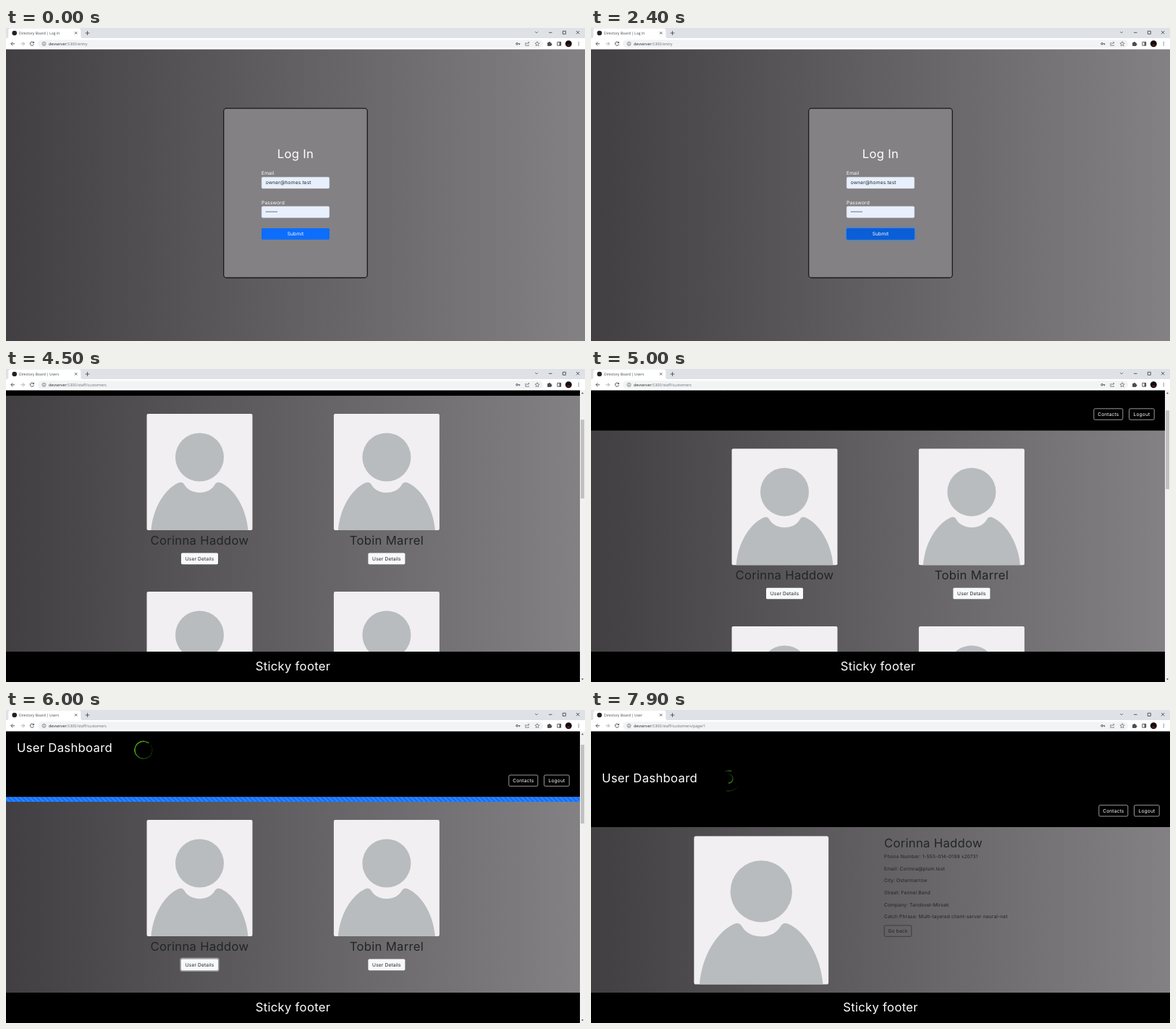
Recreate the animation shown at these times as an HTML page. Size 800x433 px, loop 8 s.

```html
<!DOCTYPE html>
<html lang="en">
<head>
<meta charset="utf-8">
<title>Directory Board</title>
<style>
  html, body { margin: 0; width: 100%; height: 100%; overflow: hidden; background: #000; }
  svg { display: block; width: 100%; height: 100%; }
  text { font: 6.67px Inter, sans-serif; letter-spacing: .13px; text-rendering: geometricPrecision; }
  .big { font-size: 16.67px; letter-spacing: .3px; }
  .mid { text-anchor: middle; }
  .light { fill: #fff; }
  .dark { fill: #212529; }
  .ui, .ui tspan { font: 5px "Open Sans", sans-serif; letter-spacing: 0; }
  .url, .url tspan { font-size: 5.4px; }
  .icon { fill: none; stroke: #4a4d51; stroke-width: .9; }
  .outline { fill: none; stroke: #fff; stroke-width: .6; }
  .field { fill: #e8f0fe; stroke: #ced4da; stroke-width: .4; }
  .pale { fill: #f8f9fa; }
</style>
</head>
<body>
<svg viewBox="0 0 800 433" preserveAspectRatio="none">
  <defs>
    <linearGradient id="shade">
      <stop stop-color="#413f41"/><stop offset="1" stop-color="#838183"/>
    </linearGradient>
    <pattern id="stripes" width="6.667" height="6.667" patternUnits="userSpaceOnUse">
      <rect width="7" height="7" fill="#0d6efd"/>
      <path d="M0 0H3.333L6.667 3.333V6.667ZM0 3.333L3.333 6.667H0Z" fill="#fff" fill-opacity=".15"/>
    </pattern>
    <g id="person">
      <rect x="-73" width="146" height="161" rx="2" fill="#f1eff2"/>
      <g fill="#b8bcbe">
        <circle cy="60" r="33.5"/>
        <path d="M-67 161C-64.500 130-48 104-29.500 95.500Q-24 93-21 98C-17 105-9.500 109 0 109S17 105 21 98Q24 93 29.500 95.500C48 104 64.500 130 67 161Z"/>
      </g>
    </g>
    <g id="details">
      <rect class="pale" x="-25.500" width="51" height="15.700" rx="1.700"/>
      <text class="mid dark" y="10.200">User Details</text>
    </g>
  </defs>

  <g id="login">
    <rect y="29" width="800" height="404" fill="url(#shade)"/>
    <rect x="300.700" y="111.200" width="198.600" height="234.300" rx="4" fill="#838183" stroke="#1b1a1b" stroke-width="1.300"/>
    <text class="big mid light" x="400" y="179.700">Log In</text>
    <text class="light" x="353" y="203.200">Email</text>
    <rect class="field" x="353.200" y="206.300" width="93.600" height="15.700" rx="1.700"/>
    <text class="dark" x="358.700" y="216.300">owner@homes.test</text>
    <text class="light" x="353" y="243.500">Password</text>
    <rect class="field" x="353.200" y="246.700" width="93.600" height="15.700" rx="1.700"/>
    <path d="M359.700 254.200H375" fill="none" stroke="#212529" stroke-width="1.300" stroke-linecap="round" stroke-dasharray="0 2.050"/>
    <rect x="353" y="277" width="94" height="15.800" rx="1.700" fill="#0d6efd"/>
    <g id="submitFocus">
      <rect x="352.200" y="276.200" width="95.600" height="17.400" rx="2.300" fill="none" stroke="#3184fd" stroke-opacity=".5" stroke-width="1.670"/>
      <rect x="353" y="277" width="94" height="15.800" rx="1.700" fill="#0b5ed7"/>
    </g>
    <text class="mid light" x="400" y="287.200">Submit</text>
  </g>

  <g id="dashboard">
    <rect id="backdrop" y="29" height="404" fill="url(#shade)"/>
    <g id="cards">
      <use href="#person" x="267.500" y="187"/>
      <use href="#person" x="525.900" y="187"/>
      <use href="#person" x="267.500" y="432.900"/>
      <use href="#person" x="525.900" y="432.900"/>
      <text class="big mid dark" x="267.500" y="368">Corinna Haddow</text>
      <text class="big mid dark" x="525.900" y="368">Tobin Marrel</text>
      <rect id="detailsFocus" x="241.200" y="378.700" width="52.600" height="17.300" rx="2.300" fill="none" stroke="#d3d4d5" stroke-opacity=".6" stroke-width="1.670"/>
      <use href="#details" x="267.500" y="379.500"/>
      <use href="#details" x="525.900" y="379.500"/>
    </g>
    <g id="profile">
      <use href="#person" transform="translate(235.250 174.500) scale(1.273)"/>
      <text class="big dark" x="405" y="190.300">Corinna Haddow</text>
      <text class="dark" x="405" y="204.900">Phone Number: 1-555-014-0199 x20731</text>
      <text class="dark" x="405" y="221.500">Email: Corinna@plum.test</text>
      <text class="dark" x="405" y="238.200">City: Ostermarrow</text>
      <text class="dark" x="405" y="254.900">Street: Fennel Bend</text>
      <text class="dark" x="405" y="271.500">Company: Tandovel-Mirsek</text>
      <text class="dark" x="405" y="288.200">Catch Phrase: Multi-layered client-server neural-net</text>
      <rect x="405.200" y="298" width="37.600" height="15.300" rx="1.700" fill="none" stroke="#212529" stroke-width="0.600"/>
      <text class="mid dark" x="424" y="308.100">Go back</text>
    </g>
    <g id="header">
      <rect y="29" width="800" height="133"/>
      <rect id="progress" y="162" width="793" height="6.667" fill="url(#stripes)"/>
      <text class="big light" x="15" y="99.800">User Dashboard</text>
      <g id="spinner" fill="none" stroke="#4fae1c" stroke-width="1.300"></g>
      <g id="nav">
        <rect class="outline" x="694.800" y="131.700" width="40" height="15.300" rx="1.700"/>
        <text class="mid light" x="714.800" y="141.800">Contacts</text>
        <rect class="outline" x="743.500" y="131.700" width="34.700" height="15.300" rx="1.700"/>
        <text class="mid light" x="760.900" y="141.800">Logout</text>
      </g>
    </g>
    <rect y="391" width="800" height="42"/>
    <text class="big mid light" id="footer" y="416.500">Sticky footer</text>
    <g id="scrollbar">
      <rect x="793" y="29" width="7" height="404" fill="#f1f1f1"/>
      <path d="M794.900 34.300L796.500 32.300L798.100 34.300ZM794.900 428.300L796.500 430.300L798.100 428.300Z" fill="#505050"/>
      <rect id="thumb" x="794" y="37" width="5" height="109" fill="#c1c1c1"/>
    </g>
  </g>

  <g id="browser">
    <rect width="800" height="14" fill="#dee1e6"/>
    <rect y="14" width="800" height="15.500" fill="#fff"/>
    <path d="M0 14.200Q3.300 14.200 3.300 11V3.500Q3.300 .5 6.500 .5H100Q103.300 .5 103.300 3.500V11Q103.300 14.200 106.500 14.200Z" fill="#fff"/>
    <rect x="44" y="16.200" width="698" height="11.300" rx="5.650" fill="#f1f3f4"/>
    <circle cx="11.700" cy="7" r="3.300" fill="#222"/>
    <text class="ui" id="title" x="18" y="8.800" fill="#3c4043"></text>
    <text class="ui url" x="59" y="23.700" fill="#202124">devserver<tspan id="path" fill="#6b6f74"></tspan></text>
    <g class="icon">
      <path d="M95 5.300L98.200 8.500M98.200 5.300L95 8.500M109.700 7H115.300M112.500 4.200V9.800"/>
      <path d="M12 21.800H6.800M9.400 19.200L6.800 21.800L9.400 24.400"/>
      <path d="M20.500 21.800H25.700M23.100 19.200L25.700 21.800L23.100 24.400" stroke="#a5a8ab"/>
      <path d="M38.100 20.200A2.600 2.600 0 1 0 38.500 22.300M38.500 18.900V20.700H36.600"/>
      <circle cx="52.500" cy="21.800" r="2.500" stroke-width=".6"/>
      <path d="M52.500 21.400V23.300M52.500 20.200V20.800" stroke-width=".7"/>
      <circle cx="706" cy="21.800" r="1.300"/>
      <path d="M707.300 21.800H710.300M709.500 21.800V23.300"/>
      <path d="M719 20.500H717.800V24.300H722.300V23M719.300 22.500Q719.500 20.300 722.800 20.200M721.500 18.800L723 20.200L721.500 21.600" stroke-width=".6"/>
      <path d="M734 18.700L734.900 20.800L737.100 21L735.400 22.500L735.900 24.700L734 23.500L732.100 24.700L732.600 22.500L730.900 21L733.100 20.800Z" stroke-width=".6"/>
      <path d="M748.500 20.500H750V19.500H751.500V20.500H753V22H754V23.300H753V24.500H748.500Z" fill="#4a4d51"/>
      <path d="M761.800 19.400H766.700V24.200H761.800Z"/>
      <path d="M765.600 19.400V24.200" stroke-width="2"/>
      <path d="M731 5L733 7L735 5" stroke-width=".7"/>
      <path d="M750 6.300H754.500M769.300 4.300H773.300V8.300H769.300ZM788 4L792.300 8.300M792.300 4L788 8.300" stroke="#222" stroke-width=".7"/>
      <path d="M791.200 19.700V24" stroke-width="1.200" stroke-linecap="round" stroke-dasharray="0 2"/>
    </g>
    <circle cx="777.300" cy="21.800" r="4.500" fill="#160b0c"/>
    <path d="M774.500 24.500Q777.300 20.500 780 24.500Z" fill="#6b2020"/>
  </g>
</svg>
<script>
const $ = id => document.getElementById(id);
const show = (id, on) => { $(id).style.display = on ? '' : 'none'; };
const shift = (id, x, y) => $(id).setAttribute('transform', `translate(${x} ${y})`);
const clamp = x => Math.min(1, Math.max(0, x));
const ramp = (t, start, length) => { const x = clamp((t - start) / length); return x * x * (3 - 2 * x); };

const LOOP = 8000, STEP = 100;
const SUBMIT = 2050, CONTACTS = 3800, OPEN = 5550, PROFILE = 7300;
const NOTCH = 41.67;
// Wheel notches: start time and direction
const wheel = [[3900, 1], [4050, 1], [4250, 1], [4750, -1], [4950, -1]];
const scrollAt = t => wheel.reduce((sum, [start, dir]) => sum + dir * NOTCH * ramp(t, start, 200), 0);

// Blend three spinner poses over time
const blend = (t, a, b, c) => t < 6000
  ? a + (b - a) * clamp((t - 3800) / 2200)
  : b + (c - b) * clamp((t - 6000) / 1900);

function comet(r, head, span, alpha, cy) {
  const pieces = 14, slice = span / pieces;
  const point = deg => {
    const a = deg * Math.PI / 180;
    return `${(190 + r * Math.cos(a)).toFixed(2)} ${(cy + r * Math.sin(a)).toFixed(2)}`;
  };
  let out = '';
  for (let i = 0; i < pieces; i++) {
    const from = head - span + i * slice;
    out += `<path d="M${point(from)}A${r} ${r} 0 0 1 ${point(from + slice * .9)}" stroke-opacity="${alpha * (i + 2) / (pieces + 1)}"/>`;
  }
  return out;
}

function drawSpinner(t) {
  const s = (t - 3800) / 1000, cy = blend(t, 94, 97, 95);
  $('spinner').innerHTML =
    comet(blend(t, 14.5, 12, 17), 80 + 268.3 * s, blend(t, 215, 345, 65), blend(t, .9, 1, .4), cy) +
    comet(blend(t, .5, 12, 11), -70 + 200 * (s - 4.1), blend(t, 360, 180, 50), 1, cy) +
    comet(blend(t, .5, 12, 6), 90 - 240 * (s - 4.1), blend(t, 360, 60, 190), 1, cy);
}

function draw(t) {
  const inside = t >= CONTACTS, profile = t >= PROFILE;
  const loading = t >= OPEN && !profile;
  const scroll = profile ? 0 : scrollAt(t);
  const width = profile ? 800 : 793;

  show('login', !inside);
  show('dashboard', inside);
  show('cards', !profile);
  show('profile', profile);
  show('scrollbar', !profile);
  show('progress', loading);

  const page = t < CONTACTS + STEP ? 'Log In' : t < PROFILE + STEP ? 'Users' : 'User';
  $('title').textContent = 'Directory Board | ' + page;
  $('path').textContent = ':5300/' + (!inside ? 'entry' : 'staff/customers' + (profile ? '/page/1' : ''));

  $('submitFocus').style.opacity = ramp(t, SUBMIT, 250);
  if (!inside) return;

  $('detailsFocus').style.opacity = ramp(t, OPEN, 200);
  $('backdrop').setAttribute('width', width);
  $('footer').setAttribute('x', width / 2);
  shift('header', 0, -scroll);
  shift('nav', width - 793, 0);
  shift('cards', 0, (loading ? 6.667 : 0) - scroll);
  shift('thumb', 0, scroll * .265);
  $('stripes').setAttribute('patternTransform', `translate(${-6.667 * ((t - OPEN) / 1000 % 1)} 162)`);
  drawSpinner(t);
}

const begin = performance.now();
function tick() {
  const t = (performance.now() - begin) % LOOP;
  draw(Math.floor(t / STEP) * STEP);
  requestAnimationFrame(tick);
}
tick();
</script>
</body>
</html>
```
